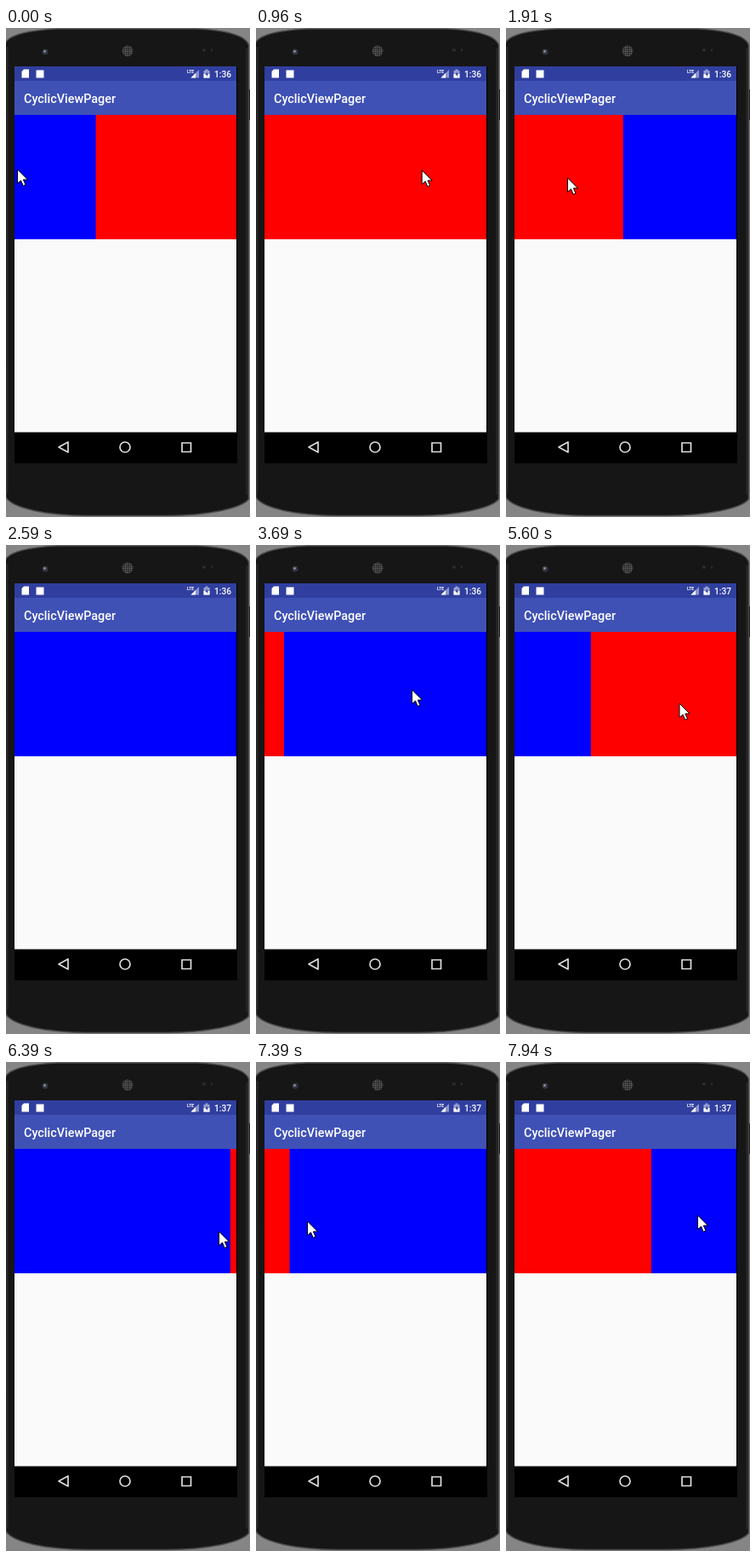
Recreate the animation shown at these times as an HTML page. Size 287 by 574 pixels, loop 8000 ms.

```html
<!DOCTYPE html>
<html lang="en">
<head>
<meta charset="utf-8">
<title>CyclicViewPager</title>
<style>
  html, body { margin: 0; width: 100%; height: 100%; overflow: hidden; background: #858585; }
  svg { display: block; }
  text { font-family: Roboto, sans-serif; font-weight: 500; fill: #fff; }
</style>
</head>
<body>
<svg width="287" height="574" viewBox="0 0 287 574">
  <defs>
    <clipPath id="view"><path d="M10 102H271V248H10z"/></clipPath>
    <pattern id="mesh" width="2.4" height="2.4" patternUnits="userSpaceOnUse">
      <circle cx="1.2" cy="1.2" r=".75" fill="#777"/>
    </pattern>
  </defs>

  <!-- phone body -->
  <path d="M285 72h2v36h-2z" fill="#111"/>
  <path d="M-1 18C3 9 22 3 60 1H225C263 3 282 9 285.5 20V553C277 564 238 572 190 572.5H95C47 572 8 564 0 551z" fill="#161616" stroke="#4c4c4c" stroke-width="1.5"/>
  <path d="M1.5 22V546M283.500 24V548" stroke="#292929" stroke-width="2"/>
  <circle cx="46" cy="28" r="3.5" fill="#33363d"/>
  <circle cx="45.500" cy="27.500" r="1.4" fill="#8990a5"/>
  <circle cx="143" cy="27" r="6.5" fill="#242424"/>
  <circle cx="143" cy="27" r="6.5" fill="url(#mesh)"/>
  <path d="M231 26h4M241 26h2" stroke="#2b2b2b" stroke-width="3"/>

  <!-- screen -->
  <path d="M10 45H272V511H10z"/>
  <path d="M10 45H271V62H10z" fill="#303f9f"/>
  <path d="M10 62H271V102H10z" fill="#3f51b5"/>
  <path d="M10 102H271V474.500H10z" fill="#fafafa"/>
  <text x="21" y="88" font-size="14.4">CyclicViewPager</text>

  <!-- status icons -->
  <g fill="#fff">
    <path d="M21 48.500h6V58.500H18.500V51z"/>
    <path d="M35.500 49.500h9v9h-9z"/>
    <path d="M217.500 58.500L227 49v9.500z" opacity=".45"/>
    <path d="M217.500 58.500L223 53v5.500z"/>
    <path d="M234.500 48.500h3v1.500h2v8.500h-7V50h2z" opacity=".5"/>
    <path d="M232.500 54h7v4.500h-7z"/>
  </g>
  <path d="M236.500 51l-2 4h1.500v2.500l2-4h-1.500z" fill="#303f9f"/>
  <text x="213" y="53" font-size="5" style="font-weight:700">LTE</text>
  <text id="clock" x="265" y="57.500" font-size="10.2" text-anchor="end">1:36</text>

  <!-- navigation -->
  <g fill="none" stroke="#ddd" stroke-width="1.7">
    <path d="M62 492l11-6v12z" stroke-linejoin="round"/>
    <circle cx="140" cy="492" r="6"/>
    <path d="M207 487h10.500v10.500h-10.500z"/>
  </g>

  <g clip-path="url(#view)">
    <path d="M10 102H271V248H10z" fill="#f00"/>
    <path id="pages" d="M-251 102H10V248H-251zM271 102H532V248H271z" fill="#00f"/>
  </g>
  <path id="cursor" d="M.5 0V16.500L4.500 13L7.200 19.300L10 18L7.300 12H12.500z" fill="#fff" stroke="#000" stroke-linejoin="round"/>
</svg>
<script>
const LOOP = 8000, TICK = 135.9, PAGE = 261;
const [pages, cursor, clock] = ["pages", "cursor", "clock"].map(id => document.getElementById(id));

const easeOut = p => 1 - (1 - p) ** 1.7;
const easeIn = p => p * p;

// Distance covered at tick n by a move lasting from start to end
const glide = (n, start, end, distance, ease = easeOut) =>
  distance * ease(Math.min(1, Math.max(0, (n - start) / (end - start))));

// Unwrapped pager offset: a settle, a swipe left, then three swipes right
const scroll = n => 95.6
  + glide(n, 0, 3, -95.6)
  + glide(n, 10.7, 18, -208)
  + glide(n, 18, 19, 208 - PAGE)
  + glide(n, 26.5, 36, PAGE)
  + glide(n, 39, 48.1, PAGE)
  + glide(n, 51, 58, 161, easeIn);

// Turning points of the pointer: tick, x, y (far left is off the stage)
const turns = [
  [0, 13, 166], [1, -600, 159], [5, 124, 159], [8, 230, 171], [11, 230, 171],
  [14, 72, 176], [19, -178, 180], [21, 39, 167], [24, 43, 173], [26, 43, 173],
  [27, 183, 170], [32, 253, 178], [35, 225, 180], [38, 45, 182], [41, 203.5, 186],
  [43, 272, 189], [47, 250, 199], [50, 32, 190], [54, 60, 187], [58, 225, 180]
];

function pointer(n) {
  const i = Math.max(1, turns.findIndex(turn => turn[0] >= n));
  const [from, x, y] = turns[i - 1], [to, nextX, nextY] = turns[i];
  const p = (n - from) / (to - from);
  return [x + (nextX - x) * p, y + (nextY - y) * p];
}

const move = (el, x, y) => el.setAttribute("transform", `translate(${x} ${y})`);

function draw(now) {
  const n = Math.floor(now % LOOP / TICK);
  move(pages, scroll(n), 0);
  move(cursor, ...pointer(n));
  clock.textContent = n < 29 ? "1:36" : "1:37";
  requestAnimationFrame(draw);
}
draw(performance.now());
</script>
</body>
</html>
```
